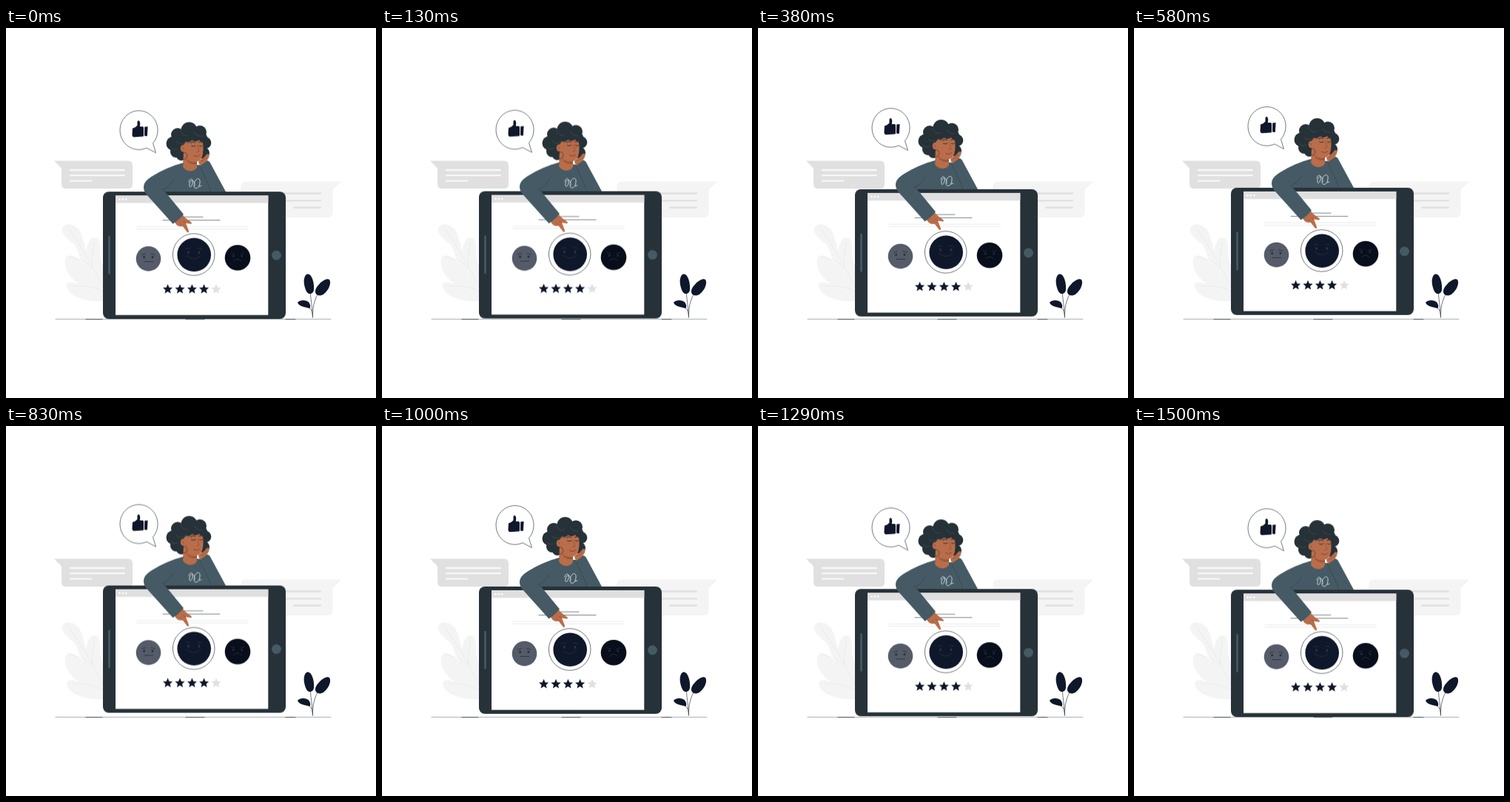
Write an HTML page that moves like this. It is 500x500 px and loops after 1.54 s.

```html
<!DOCTYPE html>
<html lang="en">
<head>
<meta charset="utf-8">
<title>Feedback</title>
<style>
  html, body { margin: 0; width: 100%; height: 100%; overflow: hidden; background: #fff; }
  svg { display: block; width: 100vw; height: 100vh; }
  .bob { animation: bob 770ms cubic-bezier(.364, 0, .636, 1) -40ms infinite alternate; }
  @keyframes bob {
    from { transform: translateY(.2px); }
    to { transform: translateY(-5.7px); }
  }
  .line { fill: none; stroke-linecap: round; stroke-linejoin: round; }
  .ink { fill: #263238; }
  .navy { fill: #0f172b; }
  .sleeve { fill: #455a64; }
  .skin { fill: #b96d4a; }
</style>
</head>
<body>
<svg viewBox="0 0 500 500">
  <defs>
    <path id="star" d="M0-6.6 1.9-2.3 6.6-1.9 3 1.2 4.1 5.8 0 3.4-4.1 5.8-3 1.2-6.6-1.9-1.9-2.3Z"/>
  </defs>

  <!-- pale foliage -->
  <g fill="#f4f4f4">
    <path d="M133 369C110 371 84 363 82 349C81 341 94 343 101 347C88 340 77 325 80 313C83 301 98 311 105 319C98 309 97 299 92 292C83 286 75 278 76 271C78 263 90 264 96 270C104 278 104 291 109 301C109 290 114 282 121 283C129 285 127 302 128 312L134 330Z"/>
    <g class="line" stroke="#e9e9e9" stroke-width=".8">
      <path d="M84 271C101 294 117 321 132 352M85 308C98 312 110 316 117 324M90 349C105 347 119 350 131 356M120 289C117 300 116 310 117 322"/>
    </g>
  </g>

  <!-- chat bubbles -->
  <path fill="#e0e0e0" d="M65 179.500H165Q171 179.500 171 185.500V211Q171 217 165 217H81Q75 217 75 211V189.500Z"/>
  <g class="line" stroke="#f7f7f7" stroke-width="2.300">
    <path d="M87 192H160M87 199.200H160M87 206.600H115"/>
  </g>
  <path fill="#f4f4f4" d="M453 207.500H324Q317.500 207.500 317.500 214V249Q317.500 256 324 256H434Q441.500 256 441.500 249V219Z"/>
  <g class="line" stroke="#e0e0e0" stroke-width="2.300">
    <path d="M370 223.500H425M370 233.300H425M389 242.600H425"/>
  </g>

  <!-- floor -->
  <path class="line" stroke="#8a9094" stroke-width=".7" d="M67 393.400H439"/>
  <path class="line" stroke="#263238" stroke-width=".7" d="M108 393.700H130M243 393.700H268M378 393.700H391"/>

  <!-- sprig -->
  <path class="line" stroke="#394047" stroke-width=".7" d="M414.500 391C414 380 412 367 410 346M414.500 391C414 374 418 361 429 349M414.300 388C414 381 410 376 402 373"/>
  <g class="navy">
    <path d="M406 333C412 330 417 342 416 354C415 360 409 361 406 356C402 348 401 337 406 333Z"/>
    <path d="M437 340C441 346 433 360 425 361.500C418 362 416 356 420 350C425 343 433 337 437 340Z"/>
    <path d="M394 371C397 367 406 367 409.500 371C412 375 411.500 378 410 379C406 377 396 377 394 371Z"/>
  </g>

  <g class="bob">
    <!-- thumbs-up bubble -->
    <path fill="#fff" stroke="#263238" stroke-width=".65" d="M198.500 155.500A25.500 26.300 0 1 0 190 161.900L202.500 168.500Z"/>
    <g class="navy">
      <path d="M171 135.500Q175 134.500 177.500 131.500V127Q177.500 124.500 180 125.200Q182 127 180.800 133H184.700Q186 133.200 186 135V145.500Q186 146.500 184.500 146.500L173 147.300Q170.500 147 170.500 144Z"/>
      <path d="M187.200 133.500 191.600 133 190.800 146 187 145.600Z"/>
    </g>

    <!-- hair behind -->
    <g class="ink">
      <circle cx="247.500" cy="138" r="11"/><circle cx="232" cy="144" r="9"/>
      <circle cx="226" cy="156" r="9.500"/><circle cx="230" cy="167" r="8"/>
      <circle cx="237" cy="172" r="7"/><circle cx="262" cy="140.500" r="9"/>
      <circle cx="269" cy="155" r="8.300"/><circle cx="267" cy="169" r="8"/>
      <path d="M228 140H266V170H230Z"/>
    </g>

    <!-- torso -->
    <path class="sleeve" d="M238 183L262 185 285 222H205L222 190Z"/>
    <path class="sleeve" d="M259 188L271 179Q275 179 277 184L297.500 222H262Z"/>
    <path class="line" stroke="#37474f" stroke-width=".7" d="M262 187C266 197 274 210 277 221"/>
    <path class="line" stroke="#e9eef0" stroke-width=".8" d="M247 208C248 202 254 203 252 210C250 217 247 215 248 210C250 203 256 206 255 213M254 210C257 201 263 202 262 209C261 219 253 218 254 212M261 214 264 213"/>

    <!-- head -->
    <path class="skin" d="M240 166H258V188C255 195 243 195 239 187Z"/>
    <path fill="#9b573a" d="M243 176C247 181 253 182 258 180.500V184C251 185 245 182 243 176Z"/>
    <path class="skin" d="M240 151H265C267 157 267.200 167 265 174C262 182 253 182 248 179C243 177 241 171 240 165Z"/>
    <ellipse class="skin" cx="239.300" cy="162.500" rx="3.600" ry="4.800"/>
    <path class="line" stroke="#8d4f34" stroke-width=".7" d="M237.500 160.500Q240 161 240 164M258.800 158 260.800 166.500 257.500 167.500"/>
    <path class="line" stroke="#263238" stroke-width=".9" d="M249.500 155Q253 152.500 256 154.500M260.500 154.300Q263 152.800 265.500 154.500M250.500 159Q253 160.700 256 159M261.500 159Q263.500 160.500 265.500 159"/>
    <path class="line" stroke="#7f3f2c" stroke-width=".9" d="M253.500 172Q257.500 175.200 261.500 171.800"/>
    <circle cx="240.500" cy="172.500" r="4.500" fill="none" stroke="#263238" stroke-width=".6"/>
    <g class="ink">
      <circle cx="237" cy="152" r="6"/><circle cx="246" cy="147.500" r="6.500"/>
      <circle cx="256" cy="146" r="7"/><circle cx="266" cy="148" r="6"/>
    </g>
    <path class="line" stroke="#455a64" stroke-width=".6" d="M230 153Q236 159 243 154Q249 157 252 152M236 139Q239 147 246 145M254 140Q258 147 265 146M223 161Q227 166 232 163"/>

    <!-- supporting hand -->
    <path class="skin" d="M260 180C263 177 267 176 269 173C271 170 274 169 274.500 171.500C275 175 272 178 271 180L262.500 186Q260 183 260 180Z"/>
    <path class="line" stroke="#8d4f34" stroke-width=".6" d="M263 180Q268 179 271 174"/>

    <!-- tablet -->
    <rect class="ink" x="131" y="221" width="247" height="172" rx="8"/>
    <rect x="148" y="226" width="206.300" height="161.700" fill="#fff"/>
    <rect x="148" y="226" width="206.300" height="10.300" fill="#e0dfe0"/>
    <g fill="#fff">
      <circle cx="153.300" cy="231.200" r="1.300"/><circle cx="157.800" cy="231.200" r="1.300"/><circle cx="162.300" cy="231.200" r="1.300"/>
    </g>
    <path class="line" stroke="#455a64" stroke-width="2.600" d="M139.500 282V331.500"/>
    <circle class="sleeve" cx="365.500" cy="307" r="6.500"/>

    <!-- screen -->
    <path class="line" stroke="#4a5358" stroke-width=".7" d="M238 255.200H266M212 259.600H289"/>
    <path class="line" stroke="#e4e4e4" stroke-width=".7" d="M177 268.300H327M177 271.500H327"/>
    <circle cx="253.700" cy="306" r="28.300" fill="#fff" stroke="#263238" stroke-width=".65"/>
    <circle cx="192.500" cy="311.600" r="16.800" fill="#555b69"/>
    <circle class="navy" cx="254.200" cy="306.300" r="22.800"/>
    <circle cx="313" cy="310.300" r="17.300" fill="#080e1b"/>
    <g class="ink">
      <circle cx="186.600" cy="309.600" r="1.500"/><circle cx="198" cy="309.600" r="1.500"/>
    </g>
    <path class="line" stroke="#263238" stroke-width=".8" d="M183.500 306.300 188.500 305M196 305 201 306.300M187 315.500H198.500"/>
    <g fill="#2c3440">
      <ellipse cx="246.500" cy="303" rx="1.400" ry="2"/><ellipse cx="261" cy="303" rx="1.400" ry="2"/>
      <circle cx="307.300" cy="308" r="1.300"/><circle cx="318.800" cy="308" r="1.300"/>
    </g>
    <path class="line" stroke="#2c3440" stroke-width=".8" d="M243 298.500Q246 296.500 248.500 297.500M259 297.500Q262 296.500 264.500 298.500M244.500 307.500Q253.500 316 263 307.500M304.500 304 309 305.500M317 305.500 321.500 304M307.500 315Q313 309.500 318.500 315"/>
    <g class="navy">
      <use href="#star" x="218.600" y="352.700"/><use href="#star" x="235" y="352.700"/>
      <use href="#star" x="251.400" y="352.700"/><use href="#star" x="267.600" y="352.700"/>
    </g>
    <use href="#star" x="284" y="352.700" fill="#e0e0e0"/>

    <!-- pointing arm -->
    <path class="skin" d="M228 262 238.500 252C242 257 246 259 250.500 262.500Q252 264.500 249 264.500L243 263.500 247 274Q247 277.500 244.700 275.500L238.500 267.500C234 269 230 267 228 262Z"/>
    <path class="line" stroke="#8d4f34" stroke-width=".6" d="M238.500 267.500 236 264M243 263.500 239.500 261.500"/>
    <path class="sleeve" d="M240 182C222 186 196 199 189 207C184 213 186 220 190 225L225.500 264.500Q233 260 240 251.500L214.500 220.500C221 217 228 213 233 209Z"/>
    <path class="line" stroke="#37474f" stroke-width=".7" d="M226 205C222 212 217 217 211 218L214.500 220.500"/>
  </g>
</svg>
</body>
</html>
```
